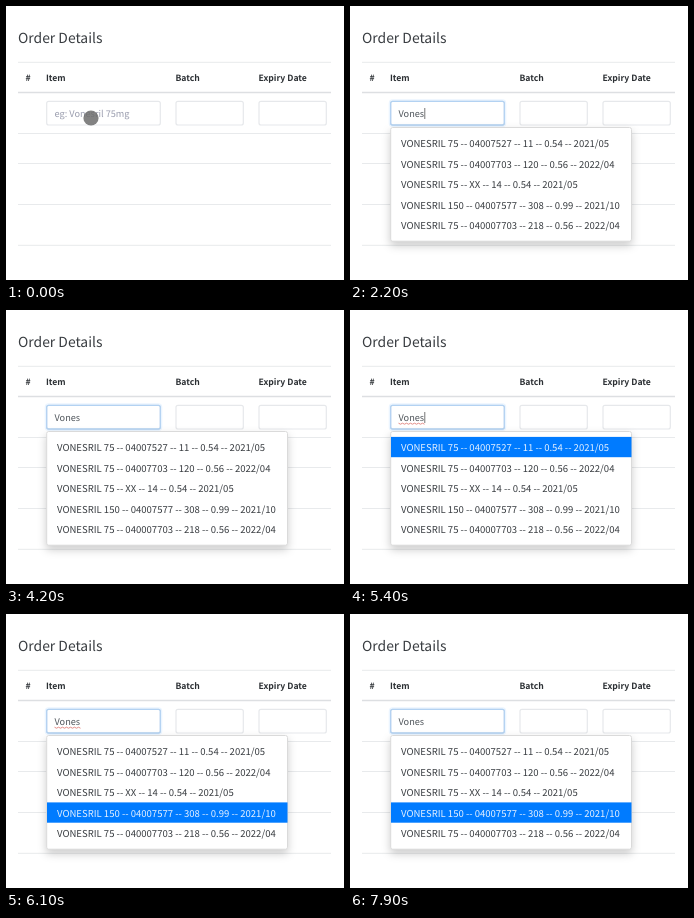
Animation of 338x276 px, one loop 8 s. Source, as an HTML page:

```html
<!DOCTYPE html>
<html lang="en">
<head>
<meta charset="utf-8">
<title>Order Details</title>
<style>
  html, body { margin: 0; width: 100%; height: 100%; overflow: hidden; background: #fff; }
  svg { display: block; width: 338px; height: 276px; }
  text {
    font-family: "Noto Sans CJK SC", "Noto Sans CJK JP", "Noto Sans", sans-serif;
    text-rendering: geometricPrecision; fill: #383c40; white-space: pre;
  }
  .title { font-size: 13.9px; }
  .head { font-size: 8.65px; font-weight: 700; fill: #2c3034; }
  .field { font-size: 9.18px; }
  .hint { fill: #9a9dae; }
  .item { font-size: 9.56px; }
  .item.on { fill: #e6f1ff; }
  .rule { stroke: #e8eaec; }
  .rule.strong { stroke: #dddfe2; stroke-width: 1.3; }
  .box { fill: #fff; stroke: #e6e8eb; stroke-width: 1.2; }
  .glow { fill: none; stroke: #007bff; stroke-opacity: .08; stroke-width: 2; }
  .focus { fill: none; stroke: #b3d2f2; stroke-width: 1.3; }
  .menu { fill: #fff; stroke: #dadada; filter: drop-shadow(0 4px 4px rgba(0, 0, 0, .2)); }
</style>
</head>
<body>
<svg viewBox="0 0 338 276">
  <text class="title" x="12" y="36.5">Order Details</text>
  <g id="table">
    <g id="rules"></g>
    <text class="head" x="19.5" y="74.5">#</text>
    <text class="head" x="40" y="74.5">Item</text>
    <text class="head" x="169.5" y="74.5">Batch</text>
    <text class="head" x="252.5" y="74.5">Expiry Date</text>
    <rect class="box" x="40.7" y="95.3" width="113.6" height="23.7" rx="2"/>
    <rect class="box" x="170" y="95.3" width="67.3" height="23.7" rx="2"/>
    <rect class="box" x="253" y="95.3" width="67.3" height="23.7" rx="2"/>
    <g id="focus">
      <rect class="glow" x="39.7" y="94.3" width="115.6" height="25.7" rx="3"/>
      <rect class="focus" x="40.7" y="95.3" width="113.6" height="23.7" rx="2"/>
    </g>
    <text class="field hint" id="hint" x="48.5" y="111">eg: Vonesril 75mg</text>
    <text class="field" id="typed" x="48.5" y="111"></text>
    <path id="squiggle" fill="none" stroke="#e0807c" stroke-width=".9"/>
    <rect id="caret" y="102" width=".9" height="11" fill="#666"/>
  </g>
  <g id="menu">
    <rect class="menu" x="40.7" y="121.5" width="240.8" height="113.7" rx="2"/>
    <rect id="bar" x="41" width="240.5" height="20.3" fill="#007bff"/>
  </g>
  <circle id="pointer" cx="85" cy="112" r="7.6" fill="#6c6c6c" fill-opacity=".85"/>
  <rect y="274" width="338" height="2" fill="#000"/>
</svg>
<script>
  const LOOP = 8000, LEFT = 48.5, PITCH = 20.5;
  const WORD = "Vones", NAME = "VONESRIL";
  const $ = id => document.getElementById(id);

  function add(parent, tag, attrs, label = "") {
    const el = document.createElementNS("http://www.w3.org/2000/svg", tag);
    for (const key in attrs) el.setAttribute(key, attrs[key]);
    el.textContent = label;
    return parent.appendChild(el);
  }

  [56.3, 86.5, 127.5, 157.5, 198.5, 239.3].forEach((y, i) =>
    add($("rules"), "line", { class: i === 1 ? "rule strong" : "rule", x1: 12, x2: 325, y1: y, y2: y }));

  const items = [
    "75 -- 04007527 -- 11 -- 0.54 -- 2021/05",
    "75 -- 04007703 -- 120 -- 0.56 -- 2022/04",
    "75 -- XX -- 14 -- 0.54 -- 2021/05",
    "150 -- 04007577 -- 308 -- 0.99 -- 2021/10",
    "75 -- 040007703 -- 218 -- 0.56 -- 2022/04"
  ].map((row, i) => add($("menu"), "text",
    { class: "item", x: 51, y: 141 + i * PITCH }, `${NAME} ${row}`));

  let wave = `M${LEFT} 113.2`;
  for (let i = 0; i < 13; i++) wave += `l2 ${i % 2 ? -1 : 1}`;
  $("squiggle").setAttribute("d", wave);

  const keys = [1100, 1300, 1500, 1600, 2000];
  const blinks = [100, 600, 1100, 2600, 3100, 3700, 4300, 4800, 5400, 5900, 6400, 7000, 7500, 7900];
  const picks = [[5100, 0], [5500, 1], [5800, 2], [6000, 3], [7200, 2], [7400, 1], [7600, 2], [7800, 3]];

  const passed = (times, t) => times.filter(at => t >= at).length;
  const show = (id, on) => $(id).setAttribute("visibility", on ? "visible" : "hidden");

  function draw(t) {
    const typed = $("typed"), count = passed(keys, t);
    typed.textContent = WORD.slice(0, count);
    typed.style.fill = t < 2000 ? "#6f7277" : "#50565c";
    show("hint", !count);

    const end = count ? typed.getComputedTextLength() : 0;
    $("caret").setAttribute("x", LEFT + end + .2);
    show("caret", passed(blinks, t) % 2);
    show("squiggle", t >= 5100 && t < 7200);

    $("focus").setAttribute("opacity", Math.min(1, Math.max(0, (t - 50) / 250)));
    $("table").setAttribute("transform", `translate(0 ${t >= 1300 && t < 2000 ? 1 : 0})`);
    show("pointer", t < 2000);
    $("menu").style.display = t >= 2100 ? "" : "none";

    const moves = picks.filter(([at]) => t >= at);
    const chosen = moves.length ? moves[moves.length - 1][1] : -1;
    $("bar").style.display = chosen < 0 ? "none" : "";
    $("bar").setAttribute("y", 126.9 + chosen * PITCH);
    items.forEach((el, i) => el.classList.toggle("on", i === chosen));
  }

  const start = performance.now();
  function tick() {
    draw((performance.now() - start) % LOOP);
    requestAnimationFrame(tick);
  }
  tick();
</script>
</body>
</html>
```
